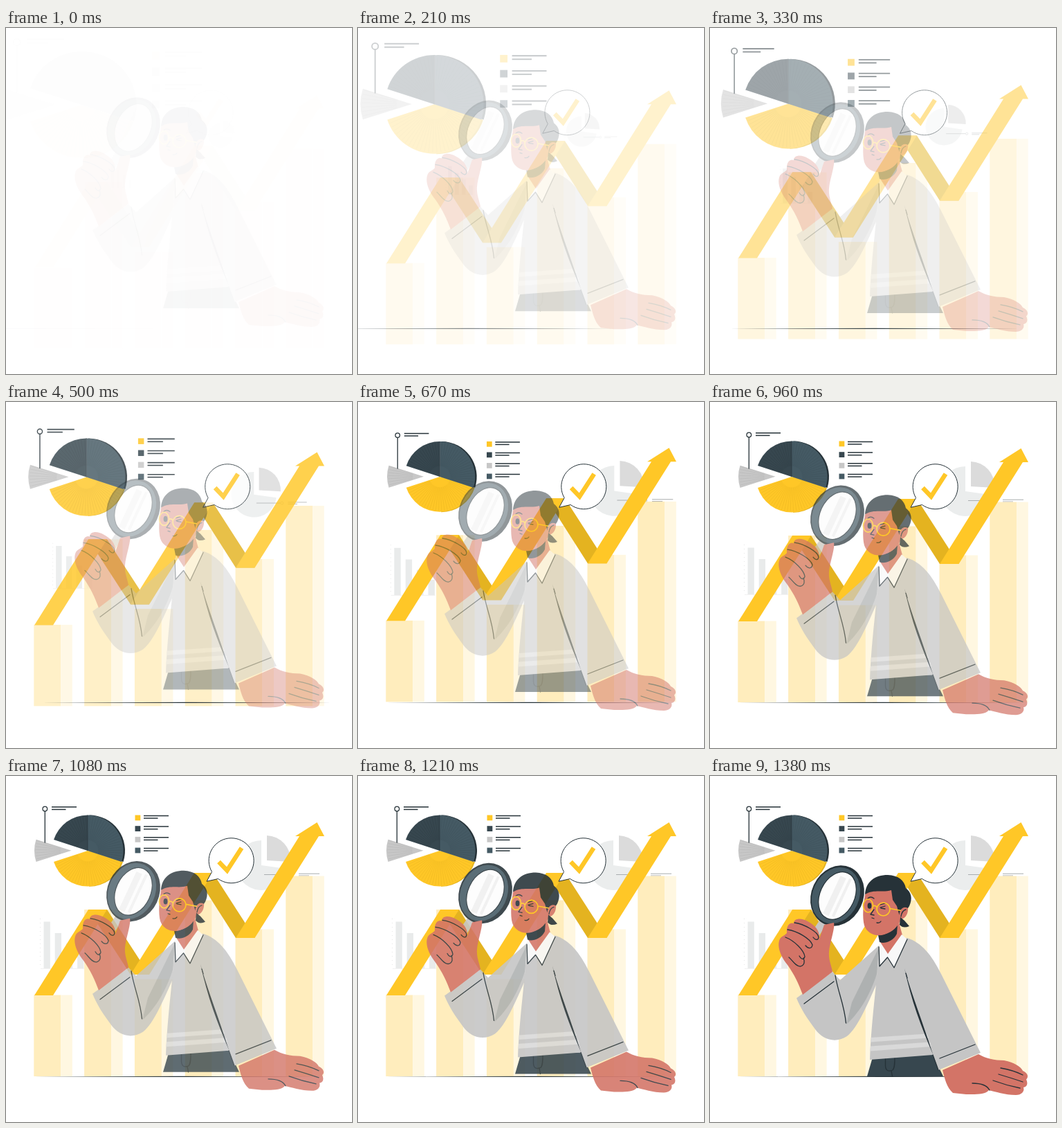
An HTML page for the animation above (1.43 s loop, 500x500 px).

```html
<!DOCTYPE html>
<html lang="en">
<head>
<meta charset="utf-8">
<title>Chart analysis</title>
<style>
  html, body { margin: 0; width: 100%; height: 100%; overflow: hidden; background: #fff; }
  svg { display: block; width: 100vw; height: 100vh; }
  .ink { fill: none; stroke: #263238; stroke-width: 1.3; stroke-linecap: round; stroke-linejoin: round; }
  .skin { fill: #d37467; }
  .wool { fill: #c5c5c5; }
  .dark { fill: #263238; }
  .gold { fill: none; stroke: #ffc727; stroke-width: 1.7; }
</style>
</head>
<body>
<svg viewBox="0 0 500 500">
  <g id="backdrop">
    <g id="smallBars" fill="#e9ebeb"></g>
    <path d="M49.5 206V278" fill="none" stroke="#e6e6e6" stroke-dasharray="1 5"/>
    <path d="M50 278.3H113" stroke="#ececec" stroke-width=".8"/>
    <path d="M369 129V93A36 36 0 1 0 404.7 134Z" fill="#ebeded"/>
    <path d="M377 122V86A36 36 0 0 1 411.5 124Z" fill="#dbdbdb"/>
    <path d="M373 142.5H411M423 141.2H453M423 144H438" stroke="#a9adaf" fill="none"/>
    <circle cx="413.5" cy="142.5" r="2.2" fill="#fff" stroke="#c5c8c9"/>
  </g>

  <g id="growth">
    <g id="bars"></g>
    <g fill="#e4b320">
      <path d="M119 193H146L207 287H180Z"/>
      <path d="M272 140H299L359.500 234H332Z"/>
    </g>
    <g fill="#ffc727">
      <path d="M41 317H68L146 193H119Z"/>
      <path d="M180 287H207L299 140H272Z"/>
      <path d="M332 234H359.500L452 87H460L449.500 67L418 87H424Z"/>
    </g>
  </g>

  <path id="floor" class="dark" d="M40 434.400L250 433.800L460 434.400L250 435Z"/>

  <g id="pie">
    <g id="slices"></g>
    <path class="ink" d="M56.300 51V96"/>
    <circle class="ink" cx="56.300" cy="47.500" r="3.300"/>
    <g id="labels" stroke="#263238" stroke-width="1.500"></g>
  </g>

  <g id="bubble">
    <path d="M297.500 138.500A32.500 32.500 0 1 1 306.500 148.500L290 152.300Z" fill="#fff" stroke="#263238" stroke-width="1" stroke-linejoin="round"/>
    <path d="M307.500 124L319.500 136.500L340.500 104" fill="none" stroke="#ffc727" stroke-width="6.500"/>
  </g>

  <g id="person">
    <path d="M236 403H322L337 434H227Z" fill="#37474f"/>
    <path class="ink" d="M253.500 407V419C254 427 259 427 264 425C267 422 267 415 267 406M262 426L263.500 434"/>

    <!-- raised arm -->
    <path class="wool" d="M125 321L177 283L188 295L244 245L241 300C229 326 214 364 198 376C181 387 163 381 152 366C140 350 131 336 125 321Z"/>
    <path d="M244 248L241 286C231 318 214 344 197 359L205 327Z" fill="#aeb1b1"/>
    <path class="ink" d="M181 288C185 313 194 330 196.500 357M136 329L179 297"/>

    <!-- torso and resting arm -->
    <path class="skin" d="M336 425L388 402C398 408 411 411 425 411C440 414 449 420 452 426C459 429 461 435 457 438.500C460 445 458 449 453 450C455 456 450 461 442 461C426 461 412 456 403 454C398 461 382 460 370 460L351 458C342 450 339 437 336 425Z"/>
    <path class="ink" d="M420 422Q438 425 452 432M417 431Q434 436 452 442M409 440Q428 447 448 451M379 444Q399 444 404 454"/>
    <path class="wool" d="M244 245C242 300 234 340 231 410L322 403L330 425L391 400L334 286C320 258 306 241 285 234Z"/>
    <path d="M233 378L313 372.500L316 378.500L232 384.500ZM232 390.500L318 384.500L320 391L231.500 397.500Z" fill="#d9d9d9"/>
    <path class="dark" d="M281 278C290 312 310 363 322.500 403C305 362 291 325 281 278Z"/>
    <path class="ink" d="M283 285L285 292M322 403L330 425M332 408L383 388"/>

    <!-- neck and collar -->
    <path class="skin" d="M244 229L247 246L257 259L278 230L272 208Z"/>
    <path class="dark" d="M243 230C256 229 266 224 271 215L270 228C265 239 251 243 245 240Z"/>
    <path d="M244 246L245 275L256.500 262L266 277L285 236L277 229L257 257L246 240Z" fill="#f8f8f8"/>
    <path class="ink" d="M244 247L245 275L256.500 262L266 277L285 236" stroke-width="1"/>

    <!-- head -->
    <path class="skin" d="M225 167C221 185 220 205 223 216C227 228 241 233 252 229C264 225 273 216 276 207C283 206 287 198 286 189L284 175L262 160Z"/>
    <path class="dark" d="M224 171C225 153 238 143 257 143C272 143.500 281 151 283 162C291 168 293 177 288 188L286 191C279 187 274 193 273.500 201L270 188L264 179L262 165C250 169 238 163 224 171Z"/>
    <path class="dark" d="M275 204L281 209L288 217Q279 221 274 215Z"/>
    <path class="ink" d="M276 203C277 197 279 194 283 193"/>
    <path class="ink" d="M228 177Q232 173 237 177" stroke-width="2.500"/>
    <ellipse class="dark" cx="230.500" cy="187.500" rx="2.900" ry="4.300"/>
    <path class="ink" d="M246 186L253 184M246 190L253 188M247 191L253 192M237 193L232 200L237 201M234 205L237 206M241 212Q245 213 247 210"/>
    <g class="gold">
      <ellipse cx="228.500" cy="187.500" rx="7" ry="9.500"/>
      <circle cx="250.500" cy="192.500" r="9.500"/>
      <path d="M235.500 188Q239 186 241.500 190M260 191.500L276 194.500"/>
    </g>

    <!-- magnifier -->
    <path d="M160 206L170 212L153 238L144 230Z" fill="#c7c7c7"/>
    <g transform="translate(184 173) rotate(25)">
      <ellipse class="dark" rx="37.500" ry="45"/>
      <ellipse cx="-2" cy=".5" rx="33.500" ry="42" fill="#455a64"/>
      <ellipse rx="25" ry="36" fill="#fdfdfd" stroke="#263238" stroke-width="1.200"/>
      <path d="M-8 -28H1V32H-8ZM5 -30H9V30H5Z" fill="#f0f0f0"/>
    </g>
    <path class="skin" d="M134 316C128 300 122 287 112 273C103 262 97 248 100 238C102 231 107 232 111 227C110 214 117 211 121 213C121 205 133 205 141 210C153 216 159 225 158 235L165 215L179 212C181 220 173 241 172 254C171 266 176 275 177 283Z"/>
    <path class="ink" stroke-width="1.600" d="M122 212C136 214 156 225 157 233C156 239 151 236 149 233M112 222C126 224 145 235 148 244C147 251 141 249 138 245M109 233C122 238 136 252 137 261C135 267 131 264 129 260M114 262C119 266 124 276 131 275C137 273 137 268 135 263"/>
  </g>
</svg>
<script>
const LOOP = 1430, FPS = 24, STEPS = 34;
const el = id => document.getElementById(id);
const rect = (x, y, w, h, fill) => `<rect x="${x}" y="${y}" width="${w}" height="${h}" fill="${fill}"/>`;
const line = (x1, y1, x2, y2) => `<path d="M${x1} ${y1}L${x2} ${y2}"/>`;

// Static charts
el('bars').innerHTML = [316.5, 193, 293.5, 179.5, 221.5, 144.5].map((top, i) => {
  const x = 40.3 + i * 72.8, h = 434 - top;
  return rect(x, top, 39, h, '#ffedbd') + rect(x + 39, top, 16.5, h, '#fff7e1');
}).join('');

el('smallBars').innerHTML = [210.5, 227, 242, 256]
  .map((top, i) => rect(54.5 + i * 16.2, top, 9.3, 278 - top, '#e9ebeb')).join('');

const polar = (cx, cy, r, deg) => {
  const a = deg * Math.PI / 180;
  return `${(cx + r * Math.sin(a)).toFixed(2)} ${(cy - r * Math.cos(a)).toFixed(2)}`;
};
function slice(cx, cy, r, from, to, fill, hatch) {
  const arc = `M${cx} ${cy}L${polar(cx, cy, r, from)}A${r} ${r} 0 0 1 ${polar(cx, cy, r, to)}Z`;
  let rays = '';
  for (let a = from + 4; a < to; a += 5)
    rays += `M${polar(cx, cy, r * .3, a)}L${polar(cx, cy, r * .97, a)}`;
  return `<path d="${arc}" fill="${fill}"/>` +
    `<path d="${rays}" stroke="${hatch}" stroke-width=".5" opacity=".3"/>`;
}
el('slices').innerHTML =
  slice(120.5, 108, 51.5, 0, 108, '#263238', '#263238') +
  slice(120, 108.3, 51.5, 108, 180, '#e4b320', '#e4b320') +
  slice(118, 108, 51.5, 108, 252, '#ffc727', '#b98d10') +
  slice(118, 108, 51.5, 288, 360, '#37474f', '#1c262b') +
  slice(118, 108, 51.5, 0, 108, '#455a64', '#2c3b42') +
  slice(94.5, 107.8, 53.5, 252.5, 287.5, '#c7c7c7', '#8a8a8a') +
  line(118, 56.5, 118, 108).replace('/>', ' stroke="#263238" stroke-width=".6"/>');

const label = (x, y, long, short) => line(x, y, x + long, y) + line(x, y + 3.6, x + short, y + 3.6);
el('labels').innerHTML = label(66, 44.8, 36, 20.5) +
  ['#ffc727', '#37474f', '#c7c7c7', '#455a64'].map((c, i) => {
    const y = 56.5 + i * 15.7;
    return rect(186.5, y, 7.8, 7.8, c).replace('/>', ' stroke="none"/>') + label(199, y + .9, 36, 20.5);
  }).join('');

// Cubic bezier easing with overshoot: (.36, -.01, .5, 1.38)
const cubic = (a, b, s) => 3 * a * s * (1 - s) ** 2 + 3 * b * s * s * (1 - s) + s ** 3;
function ease(x) {
  if (x <= 0) return 0;
  if (x >= 1) return 1;
  let lo = 0, hi = 1;
  for (let i = 0; i < 24; i++) {
    const mid = (lo + hi) / 2;
    if (cubic(.36, .5, mid) < x) lo = mid; else hi = mid;
  }
  return cubic(-.01, 1.38, lo);
}

function pose(id, opacity, transform) {
  const node = el(id);
  node.setAttribute('opacity', Math.max(0, Math.min(1, opacity)));
  node.setAttribute('transform', transform);
}
const zoom = (cx, cy, k) => `translate(${cx} ${cy}) scale(${k}) translate(${-cx} ${-cy})`;

function draw(ms) {
  // The movement advances in 24 steps per second
  const step = Math.min(STEPS, Math.floor((ms % LOOP + 5) * FPS / 1000) + 1);
  const sec = step / FPS, p = ease(sec), dash = ease(sec / .6), fall = step / STEPS;
  pose('backdrop', p, zoom(250, 182, .5 + .5 * p));
  pose('growth', p, `translate(0 ${30 * (1 - p)})`);
  pose('pie', p, zoom(138, 102, 1.5 - .5 * p));
  pose('bubble', p, `translate(${-30 * (1 - p)} 0)`);
  pose('floor', dash, `translate(${-210 * (1 - dash)} 0)`);
  pose('person', fall, `translate(0 ${-30 * (1 - fall)})`);
}

let start;
function tick(now) {
  start ??= now;
  draw(now - start);
  requestAnimationFrame(tick);
}
draw(0);
requestAnimationFrame(tick);
</script>
</body>
</html>
```
